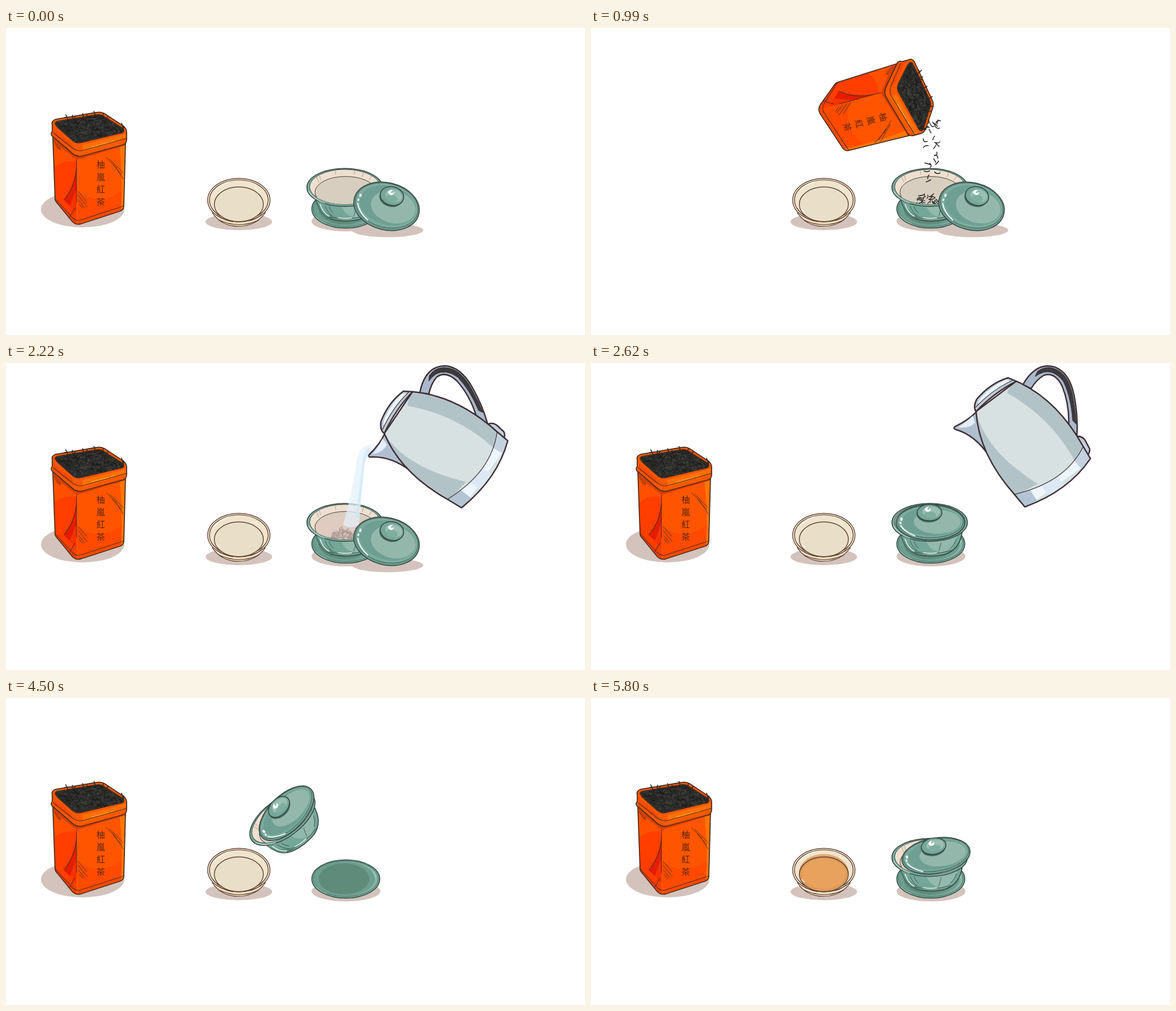
Animation of 1027x545 px, one loop 6.7 s. Source, as an HTML page:

```html
<!DOCTYPE html>
<html lang="zh-Hant">
<head>
<meta charset="utf-8">
<title>Brewing tea</title>
<style>
html, body { margin: 0; width: 100%; height: 100%; overflow: hidden; background: #fff; }
svg { display: block; width: 100%; height: 100%; }
text { font: 400 15px "Noto Sans CJK TC", "Noto Sans CJK JP", "Noto Sans CJK", sans-serif; text-anchor: middle; fill: #54250f; }
.line { fill: none; stroke-linecap: round; stroke-linejoin: round; }
</style>
</head>
<body>
<svg viewBox="0 0 1027 545" preserveAspectRatio="none">
  <defs>
    <clipPath id="mouth"><path d="M87 170Q87 166 94 165L160 154Q167 153 172 156L207 178Q212 183 206 186L135 203Q125 206 118 200L91 176Z"/></clipPath>
    <clipPath id="front"><path d="M83 180H213L209 316Q209 322 203 325L132 348Q123 350 117 343L91 311Q87 307 87 303Z"/></clipPath>
    <clipPath id="inside"><ellipse cx="601" cy="282" rx="62.5" ry="31"/></clipPath>
    <clipPath id="belly"><path d="M548 298C554 325 564 336 579 340Q604 346 630 339C648 332 656 318 659 297Z"/></clipPath>
    <clipPath id="kettleBody"><path d="M721 51Q800 58 871 122L890 138Q872 205 808 257L783 242Q700 195 671 125Z"/></clipPath>
  </defs>

  <ellipse id="tinShadow" cx="136" cy="322" rx="74" ry="32" fill="#d3c3bc"/>

  <g fill="#d3c3bc">
    <ellipse cx="413" cy="344" rx="59" ry="15"/>
    <ellipse cx="603" cy="343" rx="61" ry="18"/>
    <ellipse id="lidShadow" cx="677" cy="359" rx="63" ry="12.5"/>
  </g>

  <!-- cup -->
  <g stroke="#4b2a1a" stroke-width="1.2">
    <path d="M366 328Q382 352 412 352Q443 352 460 328Z" fill="#efe0c6"/>
    <path class="line" d="M378 341Q395 349 413 349Q432 349 448 341"/>
    <ellipse cx="413" cy="305.5" rx="55.3" ry="38.7" fill="#f6ecda"/>
    <ellipse cx="413" cy="305.5" rx="52" ry="36" fill="#efe4cd"/>
    <ellipse cx="413" cy="313" rx="43.5" ry="30.8" fill="#e9dec8" stroke="none"/>
    <g id="tea" stroke="none">
      <ellipse rx="44" ry="33" fill="#dfaa72"/>
      <ellipse cy="3" rx="43" ry="30" fill="#db9a58"/>
      <ellipse cy="2" rx="39" ry="27" fill="#e8a25e"/>
    </g>
    <ellipse cx="413" cy="313" rx="43.5" ry="30.8" fill="none"/>
    <path class="line" stroke="#fffaf0" d="M371 289Q381 278 395 274M441 282l5 4M374 322l5 5"/>
    <path class="line" stroke-width=".7" d="M367 322Q380 341 402 344M456 326Q449 338 434 342"/>
  </g>

  <!-- saucer -->
  <g stroke="#304a44">
    <ellipse cx="602.7" cy="321.3" rx="60.3" ry="34" fill="#75a899" stroke-width="1.5"/>
    <ellipse cx="602.7" cy="320.8" rx="57.5" ry="31.6" fill="#88b3a6" stroke-width=".7"/>
    <ellipse cx="600" cy="321" rx="54" ry="30.5" fill="#6d9e90" stroke="none"/>
    <ellipse cx="599.5" cy="321" rx="45" ry="27.5" fill="#5f8b7a" stroke="none"/>
    <path class="line" stroke="#b9d3ca" d="M650 307q5 6 6 12M550 335q7 8 18 12"/>
  </g>

  <!-- covered bowl -->
  <g id="bowl">
    <path d="M548 298C554 325 564 336 579 340Q604 346 630 339C648 332 656 318 659 297Z" fill="#75a798" stroke="#34433f" stroke-width="1.6"/>
    <g clip-path="url(#belly)">
      <path d="M592 310L650 305Q645 330 622 336Q600 335 592 310Z" fill="#93b9ad"/>
      <path d="M545 295Q560 330 588 336Q575 342 560 335Z" fill="#5b8d7e"/>
      <path class="line" stroke="#34433f" stroke-width=".8" d="M566 316q4 11 13 18M573 317q3 8 8 12M621 319l-4 15M648 312q-3 10-10 16M571 336Q604 343 639 333"/>
      <path class="line" stroke="#eef7f3" stroke-width="1.6" d="M557 313q5 15 16 21M590 337q13 2 23 0"/>
    </g>
    <ellipse cx="600.7" cy="283" rx="67" ry="33.8" fill="#78a99b" stroke="#34433f" stroke-width="1.5"/>
    <ellipse cx="601" cy="282" rx="62.5" ry="31" fill="#eee0d0" stroke="#34433f" stroke-width="1"/>
    <g clip-path="url(#inside)">
      <ellipse cx="602.5" cy="291.5" rx="54.5" ry="28" fill="#d8cebf" stroke="#4a3d35" stroke-width="1"/>
      <path class="line" stroke="#a58f80" stroke-width=".8" d="M551 265l4 9M556 262l2 8M634 257l-2 7M649 263l-5 7M584 254l1 6M619 254l-1 5"/>
      <path id="pile" class="line" stroke="#22211f" stroke-width="1.2"/>
      <ellipse id="water" fill="#e3cbc3" opacity=".72"/>
    </g>
    <path class="line" stroke="#d9e9e3" stroke-width="1.2" d="M537 290Q547 305 565 311"/>
    <g id="topLid"></g>
  </g>

  <g id="sideLid" transform="translate(675 316.5) rotate(14)"></g>

  <path id="teaStream" d="M438 243Q431 262 427 326Q431 330 435 326Q437 275 446 258Z" fill="#dc9c58" opacity=".85"/>
  <path id="fall" class="line" stroke="#252422" stroke-width="1.5"/>

  <!-- tea tin -->
  <g id="tin">
    <g clip-path="url(#front)">
      <rect x="78" y="180" width="140" height="175" fill="#ff5500"/>
      <path d="M80 190L125 228V350L80 310Z" fill="#ff5000"/>
      <path d="M80 254Q98 232 125 238V350L80 310Z" fill="#ff3e00"/>
      <path d="M125 250V328L103 306Q119 285 125 250Z" fill="#e51c00"/>
      <path d="M125 285V328L113 316Z" fill="#f83200"/>
      <path d="M126 290Q165 318 206 288L207 325L128 350Z" fill="#ff4a00"/>
      <path d="M201 206H214L210 325L204 322Q208 260 201 206Z" fill="#ff7600"/>
      <path d="M83 188L125 224L212 200V208L126 234L83 201Z" fill="#d93d00"/>
    </g>
    <g class="line" stroke="#4a3020">
      <path stroke-width="1.8" d="M83 192L87 303Q87 307 91 311L117 343Q123 350 132 348L203 325Q209 322 209 316L212 202"/>
      <path stroke-width="1.1" d="M87 303L117 336Q124 343 132 341L209 316M125 234L125 310M125 245Q124 280 103 305M122 320L113 336"/>
      <path stroke-width=".9" d="M178 230l18 18M184 233l24 24M189 242l16 18M195 248l13 20M128 290l15 18M128 297l16 20M129 306l10 13M130 313l6 7M86 203l7 12M90 206l6 10M95 211l2 5"/>
    </g>
    <path d="M82 172Q80 165 88 162L160 150Q168 148 175 152L208 174Q214 179 214 185L214 198Q214 204 209 207L140 226Q127 231 117 222L81 191Q79 186 82 184Z" fill="#ff5800" stroke="#4a3020" stroke-width="1.8"/>
    <path d="M135 208L206 190L212 186V197L137 220Z" fill="#ff7000"/>
    <path d="M84 176L118 206V216L84 190Z" fill="#ff4b00"/>
    <path class="line" stroke="#ff9a3c" stroke-width="1.8" d="M152 211L182 203M186 202l6-2"/>
    <path class="line" stroke="#4a3020" stroke-width="1.1" d="M84 186L119 214Q128 220 139 217L213 196"/>
    <path d="M87 170Q87 166 94 165L160 154Q167 153 172 156L207 178Q212 183 206 186L135 203Q125 206 118 200L91 176Z" fill="#2b2b29" stroke="#4a3020" stroke-width="1.6"/>
    <g clip-path="url(#mouth)" class="line" stroke-width=".9">
      <path id="leafLight" stroke="#454541"/>
      <path id="leafDark" stroke="#1a1a19"/>
    </g>
    <path class="line" stroke="#2b2b29" stroke-width="1.7" d="M106 154l4 9M118 155l-1 9M123 157l-4 5M136 152l2 8M144 155l-3 6M156 148l3 9M109 158l-5 1M173 152l-3 8M181 157l-3 6M205 169l3 9M209 174l-1 6"/>
    <g id="label"></g>
  </g>

  <path id="stream" opacity=".72" fill="#e4f2fb" d="M652 145Q629 143 623 170Q614 230 598 287Q612 296 626 287L636 178Q640 164 650 161Z"/>
  <path id="streamCore" opacity=".6" fill="#cbe4f7" d="M645 150Q635 154 633 172L620 274H626L636 178Q640 163 648 160Z"/>

  <!-- kettle -->
  <g id="kettle" stroke="#3e2e34" stroke-width="2.5" stroke-linejoin="round">
    <path d="M852 110Q861 104 870 110L883 122Q886 128 883 135L868 124Z" fill="#c2d0de"/>
    <path d="M734 53Q743 6 778 5Q806 6 827 43Q845 75 854 107L835 97Q824 59 800 32Q780 13 764 25Q754 36 750 55Z" fill="#a9b9cb"/>
    <path d="M751 22Q764 4 786 9Q810 14 829 52Q839 70 846 88L838 84Q823 48 801 25Q780 10 762 20Q755 25 750 32Z" fill="#3c3a3d" stroke-width="1"/>
    <path d="M672 125Q664 143 644 163Q642 167 647 167Q682 165 717 191Z" fill="#b0bfd0"/>
    <path d="M668 134Q660 150 650 162Q668 159 676 145Z" fill="#e4eef8" stroke="none"/>
    <g clip-path="url(#kettleBody)" stroke="none">
      <path d="M650 40H900V270H650Z" fill="#d7e1e1"/>
      <path d="M718 45Q810 55 875 120L864 150Q800 92 712 76Z" fill="#b2c3c8"/>
      <path d="M668 120Q705 185 816 211L783 247Q700 205 668 120Z" fill="#b2c3c8"/>
      <path d="M871 122Q862 193 783 242L808 260L895 138Z" fill="#edf5fd"/>
      <path d="M870 122L892 138L884 162L864 151Z" fill="#c4d2df"/>
      <path d="M846 187L868 202L846 228L823 212Z" fill="#dce9f5"/>
      <path d="M807 226L827 241L808 260L783 242Z" fill="#b3c5d4"/>
    </g>
    <path d="M721 51Q800 58 871 122L890 138Q872 205 808 257L783 242Q700 195 671 125Z" fill="none"/>
    <path class="line" stroke-width="1.3" d="M871 122Q862 193 783 242"/>
    <path d="M705 50L721 51Q691 82 671 125Q663 120 665 104Q678 70 705 50Z" fill="#bccbd8"/>
    <path d="M703 54L711 55Q687 82 671 112Q668 106 672 98Q683 72 703 54Z" fill="#edf5fc" stroke="none"/>
    <path class="line" stroke-width="1.2" d="M714 52Q685 80 668 118"/>
  </g>
</svg>
<script>
const $ = id => document.getElementById(id);
const LOOP = 6700;

let seed = 7;
const rnd = () => (seed = seed * 16807 % 2147483647) / 2147483647;
const spread = r => (rnd() * 2 - 1) * r;

// a short bent leaf centred on x, y
function leaf(x, y, size) {
  const a = rnd() * 6.28, dx = Math.cos(a) * size, dy = Math.sin(a) * size * .7;
  const n = v => v.toFixed(1);
  return `M${n(x - dx)} ${n(y - dy)}Q${n(x + spread(size))} ${n(y + spread(size))} ${n(x + dx)} ${n(y + dy)}`;
}
const leaves = (count, make) => Array.from({ length: count }, make).join('');

function tinLeaf() {
  const u = rnd(), v = rnd();
  return leaf(88 + 84 * u + 38 * v, 166 - 13 * u + 36 * v, 5);
}
$('leafLight').setAttribute('d', leaves(150, tinLeaf));
$('leafDark').setAttribute('d', leaves(130, tinLeaf));

const pile = Array.from({ length: 85 }, () => {
  const u = spread(1);
  return leaf(597 + u * 22, 312 - rnd() * 19 * (1 - u * u), 4.2);
});
const drops = Array.from({ length: 34 }, () => ({ x: 598 + spread(19), delay: rnd() * .5, seed: 1 + Math.floor(rnd() * 1e6) }));

$('label').innerHTML = [...'柚嵐紅茶'].map((c, i) => `<text x="168" y="${247.5 + 22 * i}">${c}</text>`).join('');

const oval = (x, y, rx, ry, fill, extra = '') =>
  `<ellipse cx="${x}" cy="${y}" rx="${rx}" ry="${ry}" fill="${fill}" ${extra}/>`;

function lid(rx, ry, kx, ky, kr, kh) {
  const ink = 'stroke="#34433f" stroke-width="1.5"';
  return oval(0, 0, rx, ry, '#6b9d8f', ink) +
    oval(0, -1.5, rx - 2.5, ry - 3, '#7cac9e', 'stroke="#34433f" stroke-width=".7"') +
    oval(rx * .03, -ry * .05, rx * .86, ry * .82, '#6f9f92') +
    oval(rx * .2, -ry * .04, rx * .68, ry * .68, '#93b8ab') +
    `<path class="line" stroke="#f4fbf8" stroke-width="2" d="M${-rx * .86} ${ry * .18}Q${-rx * .76} ${ry * .52} ${-rx * .45} ${ry * .76}"/>` +
    oval(-rx * .84, -ry * .18, 2, 3, '#fff') + oval(-rx * .87, ry * .02, 1.7, 2.2, '#fff') +
    oval(kx - 1, ky + 3, kr, kh, '#44675d') +
    oval(kx, ky, kr, kh, '#76a798', ink) +
    oval(kx + 3, ky - 1, kr * .72, kh * .68, '#9abfb2') +
    oval(kx + 1, ky + 4, kr * .5, kh * .4, '#7fae9f') +
    `<g class="glint" fill="#fff"><path d="M${kx - 9} ${ky - 5}q2-5 8-6q-4 4-2 6q3 0 5-3q1 6-5 7q-4-1-6-4Z"/></g>`;
}
$('sideLid').innerHTML = lid(59, 42, 5, -20, 21, 16.5);
$('topLid').innerHTML = lid(61, 31.5, -1.5, -17.5, 22, 14.5);
const glint = $('topLid').querySelector('.glint');

const show = (id, on) => $(id).style.display = on ? '' : 'none';
const set = (id, attrs) => { for (const k in attrs) $(id).setAttribute(k, attrs[k]); };
const move = (id, value) => set(id, { transform: value });
const mix = (a, b, p) => a + (b - a) * p;

function pourLeaves(t) {
  const p = t < 860 ? 0 : Math.min(1, (Math.floor((t - 860) / 58) + 1) / 6);
  set('pile', { d: pile.slice(0, Math.round(pile.length * Math.max(0, (p - .3) / .7))).join('') });
  let d = '';
  if (p > 0 && p < 1) for (const drop of drops) {
    const q = (p - drop.delay) / .5;
    if (q < 0 || q > 1) continue;
    seed = drop.seed;
    d += leaf(drop.x, 165 + 140 * q * q, 5);
  }
  set('fall', { d });
}

function draw(t) {
  const tilted = t >= 730 && t < 1420;
  move('tin', tilted ? 'translate(486 167) rotate(74.6) translate(-168 -275)' : '');
  show('tinShadow', !tilted);
  pourLeaves(t);

  show('kettle', t >= 1520 && t < 2720);
  move('kettle', t < 1690 || t >= 2620 ? 'translate(5 -7) rotate(19 770 130)' : '');
  const pouring = t >= 1820 && t < 2450;
  for (const id of ['stream', 'streamCore', 'water']) show(id, pouring);
  const level = t < 2020 ? 0 : t < 2220 ? 1 : 2;
  set('water', { cx: 592.5, cy: 304 - 4 * level, rx: 27 + 8 * level, ry: 16 + 5 * level });

  const covered = t >= 2450;
  show('sideLid', !covered);
  show('lidShadow', !covered);
  show('topLid', covered);
  show('pile', !covered);
  move('topLid', t < 3560 ? 'translate(602 283)' : 'translate(612 280) rotate(-9)');
  const shift = t < 2720 || t >= 3560 ? 0 : t < 2890 ? 2 : t < 3090 ? 4 : 1;
  glint.setAttribute('transform', `translate(${shift} 0)`);

  const lift = (x, y, a) => `translate(${x} ${y}) rotate(${a}) translate(-608 -264)`;
  move('bowl', t < 4030 || t >= 5800 ? '' : t < 4500 ? lift(538, 200, -15) : lift(485, 194, -36));

  const fill = t < 4900 ? 0 : Math.min(1, (Math.floor((t - 4900) / 30) + 1) / 11);
  show('tea', t >= 4570);
  show('teaStream', t >= 4570 && t < 5200);
  move('tea', `translate(${mix(425, 413, fill)} ${mix(325, 310, fill)}) scale(${mix(.75, 1, fill)} ${mix(.48, 1, fill)})`);
}

const start = performance.now();
function frame(now) {
  draw(Math.max(0, now - start) % LOOP);
  requestAnimationFrame(frame);
}
draw(0);
requestAnimationFrame(frame);
</script>
</body>
</html>
```
